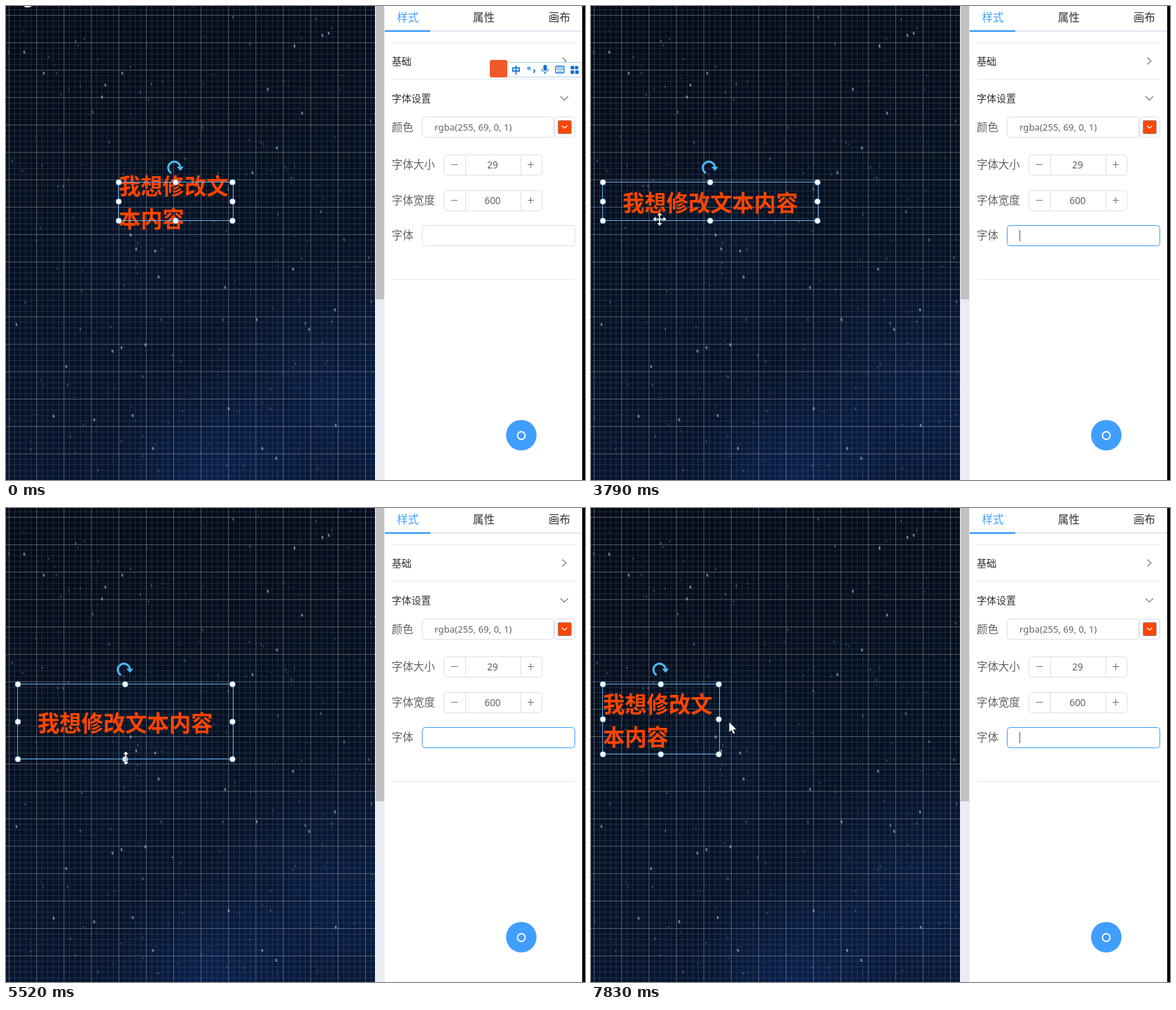
Recreate the animation shown at these times as an HTML page with a canvas. Size 827 px wide and 677 px high, loop 8 s.

```html
<!DOCTYPE html>
<html lang="zh">
<head>
<meta charset="utf-8">
<title>文本编辑</title>
<style>
html, body { margin: 0; width: 100%; height: 100%; overflow: hidden; background: #fff; }
canvas, svg { position: absolute; left: 0; top: 0; display: block; }
#label {
  position: absolute; display: flex; align-items: center; justify-content: center;
  font: 700 31.3px/47px "Noto Sans CJK SC", "Noto Sans CJK", sans-serif; color: #ff4500;
}
svg text { font-family: "Noto Sans CJK SC", "Noto Sans CJK", sans-serif; font-size: 15.4px; fill: #606266; }
svg .head { font-size: 14px; fill: #303133; }
svg .tab { fill: #303133; }
svg .num { font: 13.5px "Noto Sans", sans-serif; }
.field { fill: #fff; stroke: #dcdfe6; }
.rule { stroke: #e6e9ef; }
.icon { fill: none; stroke: #73767a; stroke-width: 1.1; }
.pointer path { fill: #fff; stroke: #111; stroke-width: 1; stroke-linejoin: round; paint-order: stroke; }
#ime rect.key, #ime circle { fill: #0b6fd6; }
</style>
</head>
<body>
<canvas id="sky" width="527" height="677"></canvas>
<div id="label"><span>我想修改文本内容</span></div>
<svg width="827" height="677" viewBox="0 0 827 677">
  <defs>
    <g id="stepper">
      <rect class="field" x=".5" y=".5" width="140" height="29" rx="4"/>
      <path class="rule" d="M31.5 1V29M110.5 1V29" style="stroke:#dcdfe6"/>
      <path class="icon" d="M11 14.5H20M120 14.5H129M124.5 10V19"/>
    </g>
  </defs>

  <g id="frame">
    <rect id="outline" fill="none" stroke="#5fb0ee"/>
    <g id="handles" fill="#fff" stroke="#59a9ea" stroke-width=".7"></g>
    <g id="rotate">
      <path d="M-6 238.6A8.6 8.6 0 1 1 6.6 230" fill="none" stroke="#4bb8f3" stroke-width="3"/>
      <path d="M1.5 229.5H11.5L7 235.5Z" fill="#4bb8f3"/>
    </g>
  </g>

  <rect x="527" width="14" height="677" fill="#e9edf3"/>
  <rect x="528" width="12" height="419" fill="#c1c1c1"/>
  <rect x="541" width="282" height="677" fill="#fff"/>
  <rect x="823" width="4" height="677" fill="#000"/>

  <text class="tab" x="558.5" y="22" style="fill:#409eff">样式</text>
  <text class="tab" x="667" y="22">属性</text>
  <text class="tab" x="775" y="22">画布</text>
  <rect x="541" y="35" width="282" height="2" fill="#e4e7ed"/>
  <rect x="541" y="34.5" width="65" height="2.5" fill="#409eff"/>
  <path class="rule" d="M551 52.5H813M551 104.5H813M551 390.5H813"/>
  <text class="head" x="551" y="84">基础</text>
  <path class="icon" d="M794.5 73.5L800 78.5L794.5 83.5"/>
  <text class="head" x="551" y="137">字体设置</text>
  <path class="icon" d="M792 129L797.5 134.500L803 129"/>

  <text x="551" y="179">颜色</text>
  <rect class="field" x="594.5" y="158.500" width="188" height="29" rx="4"/>
  <text class="num" x="612" y="178" style="font-size:13.2px">rgba(255, 69, 0, 1)</text>
  <rect class="field" x="783.5" y="158.500" width="29" height="29" rx="4"/>
  <rect x="788.5" y="163.500" width="19" height="19" rx="1.5" fill="#ff4500" stroke="#a09a98"/>
  <path d="M794 171L797.8 174.500L801.5 171" fill="none" stroke="#fff" stroke-width="1.2"/>

  <text x="551" y="232">字体大小</text>
  <use href="#stepper" x="625" y="212"/>
  <text class="num" x="695" y="232" text-anchor="middle">29</text>
  <text x="551" y="283">字体宽度</text>
  <use href="#stepper" x="625" y="263"/>
  <text class="num" x="695" y="283" text-anchor="middle">600</text>
  <text x="551" y="333">字体</text>
  <rect id="input" class="field" x="594.5" y="313.500" width="218" height="29" rx="4"/>
  <path id="caret" d="M612.5 320V336" stroke="#55585d"/>

  <circle cx="736" cy="613" r="21.800" fill="#409eff"/>
  <circle cx="736" cy="613.500" r="5.500" fill="none" stroke="#fff" stroke-width="1.8"/>

  <g id="ime">
    <rect x="704.5" y="80.500" width="117" height="21" fill="#fff" stroke="#b3d0ec"/>
    <rect x="691" y="77" width="25" height="25" rx="3" fill="#f0592a"/>
    <text x="722" y="96" style="font-size:13px;font-weight:700;fill:#0b6fd6">中</text>
    <circle cx="747" cy="89" r="1.700" style="fill:none;stroke:#0b6fd6;stroke-width:1.3"/>
    <path d="M753 91.500h2v2l-1.500 2" fill="none" stroke="#0b6fd6" stroke-width="1.5"/>
    <rect class="key" x="767.5" y="84" width="5" height="8.500" rx="2.500"/>
    <path d="M765.500 90a4.500 4.500 0 0 0 9 0M770 94.500V97.500" fill="none" stroke="#0b6fd6" stroke-width="1.2"/>
    <rect x="785" y="86" width="12" height="9.500" rx="1" fill="none" stroke="#0b6fd6" stroke-width="1.3"/>
    <path d="M787 88.800H796M787 91H796M788.500 93.500H794" stroke="#0b6fd6" stroke-width="1.2" stroke-dasharray="1.5 .7"/>
    <rect class="key" x="806.500" y="85.500" width="5" height="5" rx="1"/>
    <circle cx="815" cy="88" r="2.600"/>
    <rect class="key" x="806.500" y="92" width="5" height="5" rx="1"/>
    <rect class="key" x="813" y="92" width="5" height="5" rx="1"/>
  </g>

  <g id="pointer" class="pointer">
    <path data-kind="hand" d="M-1 0q2 -1 3 1v6l7 2q2 1 1 4l-3 6q-1 3 -5 3h-3q-3 0 -4 -3l-4 -6q0 -3 3 -1l3 2v-12z" transform="translate(0 -4)"/>
    <path data-kind="arrow" d="M0 0V14L3.300 11L5.800 16.500L8 15.500L5.600 10.200H10Z"/>
    <path data-kind="move" d="M0 -9.500L3.500 -5.500H.8V-.8H5.500V-3.500L9.500 0L5.500 3.500V.8H.8V5.500H3.500L0 9.500L-3.500 5.500H-.8V.8H-5.500V3.500L-9.500 0L-5.500 -3.500V-.8H-.8V-5.500H-3.500Z"/>
    <path data-kind="ew" d="M-9.500 0L-5.500 -3.800V-.9H5.500V-3.800L9.500 0L5.500 3.800V.9H-5.500V3.800Z"/>
    <path data-kind="ns" d="M-9.500 0L-5.500 -3.800V-.9H5.500V-3.800L9.500 0L5.500 3.800V.9H-5.500V3.800Z" transform="rotate(90)"/>
  </g>
</svg>

<script>
const $ = id => document.getElementById(id);
const LOOP = 8000, TOP = 251.5;

// Bursts of motion: first step, last step, number of steps
const bursts = [[260, 1300, 8], [1470, 2380, 7], [2840, 3330, 4], [3790, 4250, 4],
  [4550, 5520, 7], [5660, 6670, 7], [6830, 7830, 7]];
const leftKeys = [[2840, 161], [3330, 17]];
const rightKeys = [[6670, 323.5], [7497, 182.500]];
const bottomKeys = [[4400, 306], [5020, 387], [5197, 372], [5520, 358], [5660, 351]];
const pointerKeys = [[0, 30, -16], [1300, 213, 214], [1622, 213, 279], [2380, 168, 285],
  [2840, 174, 283], [3330, 18, 288], [3790, 98, 304.500], [4250, 171, 306], [4550, 171, 318],
  [5020, 171, 387], [5197, 171.500, 371.500], [5660, 171, 351], [5997, 181, 352],
  [6670, 323, 301], [7497, 183, 303], [7830, 197.500, 306]];
const kinds = [[0, 'hand'], [200, 'arrow'], [1400, 'move'], [2300, 'ew'], [3700, 'move'],
  [4200, 'ns'], [5800, 'arrow'], [6600, 'ew'], [7600, 'arrow']];

function stepTime(t) {
  let held = 0;
  for (const [from, to, count] of bursts) {
    if (t < from) break;
    const gap = (to - from) / (count - 1);
    held = Math.min(to, from + Math.floor((t - from + 20) / gap) * gap);
  }
  return held;
}

function at(keys, t) {
  const next = keys.findIndex(key => key[0] > t);
  if (next === 0) return keys[0].slice(1);
  if (next < 0) return keys[keys.length - 1].slice(1);
  const a = keys[next - 1], b = keys[next], p = (t - a[0]) / (b[0] - a[0]);
  return a.slice(1).map((v, i) => v + (b[i + 1] - v) * p);
}

function setAttrs(el, attrs) {
  for (const name in attrs) el.setAttribute(name, attrs[name]);
}

function paintSky() {
  const c = $('sky').getContext('2d'), w = 527, h = 677;
  const base = c.createLinearGradient(0, 0, 120, h);
  base.addColorStop(0, '#040b1a');
  base.addColorStop(.5, '#051122');
  base.addColorStop(1, '#061530');
  c.fillStyle = base;
  c.fillRect(0, 0, w, h);

  const glow = (x, y, r, alpha) => {
    const g = c.createRadialGradient(x, y, 0, x, y, r);
    g.addColorStop(0, `rgba(16,46,110,${alpha})`);
    g.addColorStop(1, 'rgba(16,46,110,0)');
    c.fillStyle = g;
    c.fillRect(0, 0, w, h);
  };
  glow(290, 670, 150, .45);
  glow(470, 560, 200, .35);
  glow(200, 340, 130, .15);

  const star = (x, y, size, alpha) => {
    c.fillStyle = `rgba(165,190,215,${alpha})`;
    c.beginPath();
    c.ellipse(x, y, size * .6, size, -.2, 0, 7);
    c.fill();
  };
  let seed = 11;
  const rnd = () => (seed = seed * 16807 % 2147483647) / 2147483647;
  for (let i = 0; i < 260; i++) star(rnd() * w, rnd() * h, 1 + rnd() * 1.4, .1 + rnd() * .25);
  const bright = [54, 96, 26, 66, 142, 113, 137, 130, 166, 96, 387, 203, 452, 42, 461, 39, 412, 57,
    374, 119, 423, 153, 352, 238, 186, 347, 178, 327, 213, 350, 218, 387, 313, 402, 358, 448, 470, 434,
    433, 462, 86, 515, 152, 493, 165, 488, 199, 484, 181, 585, 68, 586, 318, 575, 386, 646, 366, 632,
    210, 632, 126, 591, 471, 599, 410, 376, 15, 455];
  for (let i = 0; i < bright.length; i += 2) star(bright[i], bright[i + 1], 2.400, .6);

  const grid = (gap, x0, y0, color) => {
    c.strokeStyle = color;
    c.lineWidth = .8;
    c.beginPath();
    for (let x = x0; x < w; x += gap) { c.moveTo(x, 0); c.lineTo(x, h); }
    for (let y = y0; y < h; y += gap) { c.moveTo(0, y); c.lineTo(w, y); }
    c.stroke();
  };
  grid(7.83, 4.600, 5.500, 'rgba(207,207,207,.17)');
  grid(39.15, 4.600, 13.300, 'rgba(186,186,186,.42)');
}

const spots = [[0, 0], [.5, 0], [1, 0], [0, .5], [1, .5], [0, 1], [.5, 1], [1, 1]];
const handles = spots.map(() => {
  const dot = document.createElementNS($('handles').namespaceURI, 'circle');
  dot.setAttribute('r', 4);
  return $('handles').appendChild(dot);
});
const shapes = [...$('pointer').children];

function draw(now) {
  const t = stepTime(now % LOOP);
  const [left] = at(leftKeys, t), [right] = at(rightKeys, t), [bottom] = at(bottomKeys, t);
  const width = right - left, height = bottom - TOP + .5;

  Object.assign($('label').style,
    { left: left + 'px', top: TOP + 'px', width: width + 'px', height: height + 'px' });
  setAttrs($('outline'), { x: Math.floor(left) - .5, y: TOP, width: Math.round(width) + 1, height: Math.round(height) });
  handles.forEach((dot, i) => setAttrs(dot,
    { cx: left + width * spots[i][0], cy: TOP + .3 + height * spots[i][1] }));
  $('rotate').setAttribute('transform', `translate(${left + width / 2} 0)`);

  const focused = t > 2900, phase = t % 1060;
  $('input').style.stroke = focused ? '#409eff' : '#dcdfe6';
  $('ime').style.display = focused ? 'none' : '';
  $('caret').style.display = t >= 2840 && phase >= 400 && phase <= 960 ? '' : 'none';

  const [x, y] = at(pointerKeys, t);
  const kind = kinds.filter(k => k[0] <= t).pop()[1];
  $('pointer').setAttribute('transform', `translate(${x} ${y})`);
  shapes.forEach(s => s.style.display = s.dataset.kind === kind ? '' : 'none');
}

paintSky();
let start;
function tick(now) {
  start ??= now;
  draw(now - start);
  requestAnimationFrame(tick);
}
draw(0);
requestAnimationFrame(tick);
</script>
</body>
</html>
```
